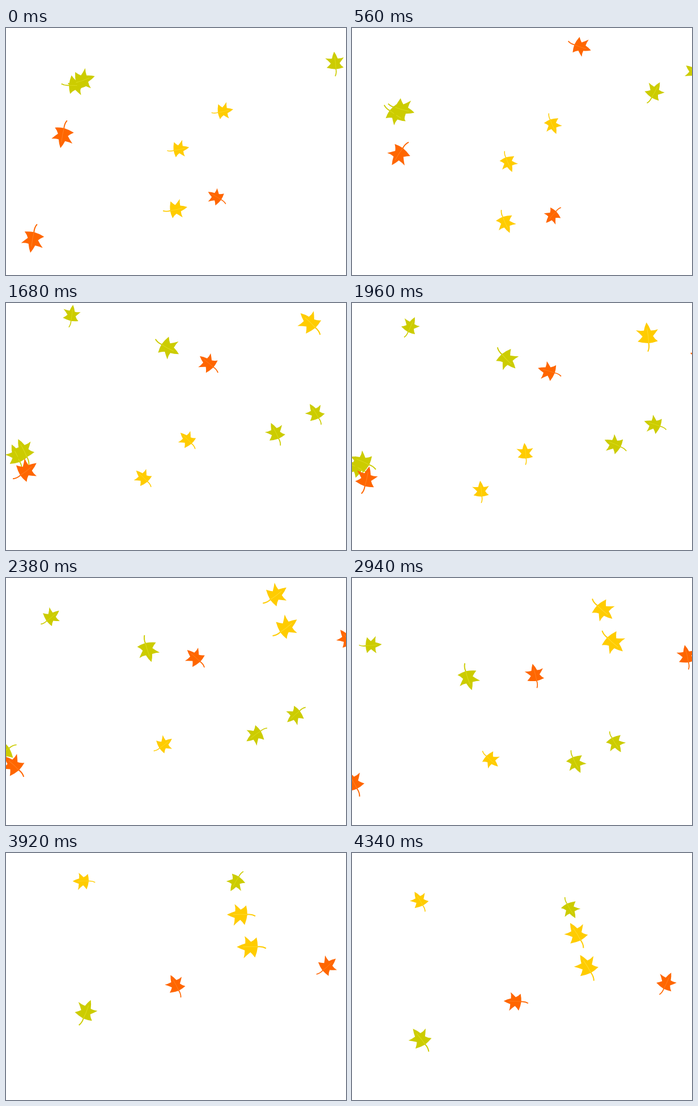
An HTML page with a canvas for the animation above (4.48 s loop, 600 by 436 pixels).

```html
<!DOCTYPE html>
<html lang="en">
<head>
<meta charset="utf-8">
<title>Falling leaves</title>
<style>
  html, body { margin: 0; width: 100%; height: 100%; overflow: hidden; background: #fff; }
  canvas { display: block; }
</style>
</head>
<body>
<canvas id="stage" width="600" height="436"></canvas>
<script>
const STEP = 140, STEPS = 32;
const ctx = document.getElementById('stage').getContext('2d');
const rad = degrees => degrees * Math.PI / 180;

// Uneven breeze: a smooth curve through a few points [step, dx, dy].
function breeze(...points) {
  const end = points.length - 1;
  const slope = (k, axis) => {
    const a = points[Math.max(k - 1, 0)], b = points[Math.min(k + 1, end)];
    return (b[axis] - a[axis]) / (b[0] - a[0]);
  };
  return t => {
    let i = 0;
    while (i < end - 1 && points[i + 1][0] <= t) i++;
    const p = points[i], q = points[i + 1], span = q[0] - p[0];
    const u = (t - p[0]) / span, v = 1 - u;
    return [1, 2].map(axis => v * v * (1 + 2 * u) * p[axis] + u * u * (3 - 2 * u) * q[axis]
      + span * u * v * (v * slope(i, axis) - u * slope(i + 1, axis)));
  };
}

// Turns back fast for 14 steps, then forward slowly for 12.
function swing(t, { peak, top }) {
  const cycle = Math.floor((t - peak) / 26), phase = t - peak - cycle * 26;
  return top - 177 * cycle + (phase < 14 ? -20 * phase : -280 + 8.6 * (phase - 14));
}

const tumble = t => 174 + 19.7 * t;

// Steady fall while tumbling around a point beside the leaf.
function orbit(t) {
  const a = rad(tumble(t) - 58);
  return [-6.4 * t + 9 * Math.cos(a), 8.6 * t + 9 * Math.sin(a)];
}

const green = {
  fill: '#cccc00', vein: '#dddd22', turn: swing,
  drift: breeze([0, 0, 0], [7, -78, 92], [12, -105, 168], [17, -141, 216], [24, -219, 307], [31, -270, 416])
};
const orange = {
  fill: '#ff6600', vein: '#ff8126', turn: swing,
  drift: breeze([0, 0, 0], [7, -32, 59], [12, -64, 106], [17, -87, 140], [24, -106, 195], [31, -134, 262])
};
const yellow = { fill: '#ffcc00', vein: '#ffda33', turn: tumble, drift: orbit };

const leaves = [];
function leaf(kind, size, x, y, peak, top) {
  leaves.push({ kind, size, x, y, peak, top });
}

leaf(green, .92, 124, 101, 4.4, 223);
leaf(green, .95, 136, 92, 5, 210);
leaf(green, .84, 581, 61, 7.7, 156);
leaf(green, .81, 651, 26, 10.3, 98);
leaf(green, .95, 391, -88.5, 19.8, 282);
leaf(green, .78, 221, -147, 22.8, 196);
leaf(green, .8, 655, -317, 25, 366);

leaf(orange, .97, 100, 190, 3.6, 317);
leaf(orange, 1, 47, 374, 0, 286);
leaf(orange, .73, 371, 298, 0, 37);
leaf(orange, .84, 421, 0, 25.4, 120);
leaf(orange, .85, 689, -33, 29.3, 155);

leaf(yellow, .75, 388, 139, 0, 0);
leaf(yellow, .76, 310, 206, 0, 0);
leaf(yellow, .84, 305, 312, 0, 0);
leaf(yellow, 1, 604, -68, 0, 0);
leaf(yellow, .97, 586, -125, 0, 0);
leaf(yellow, .77, 309, -184, 0, 0);

// The leaf points along +x with its stem behind it.
const blade = new Path2D(`M-14 0 Q-14 8 -12 16.5 Q-7 11 -2 9 Q3 14 9 19
  Q7 12 8 6 Q16 4 23 0 Q16 -4 9 -6 Q9 -13 11 -20
  Q5 -14 -1 -9.5 Q-5 -13 -9 -19 Q-13 -9 -14 0Z`);
const stem = new Path2D('M-13 0 Q-22 1 -28.5 -3');
const vein = new Path2D('M-14 0 Q-2 1 12 0');

function drawLeaf(item, t) {
  const { kind, size } = item, [dx, dy] = kind.drift(t);
  const x = item.x + dx, y = item.y + dy;
  // Leaves appear at the top edge; larger ones last a little longer.
  if (y < 3 || y > 275 + 100 * size) return;
  ctx.save();
  ctx.translate(x, y);
  ctx.rotate(rad(kind.turn(t, item) + 174));
  ctx.scale(size, size);
  ctx.fillStyle = ctx.strokeStyle = kind.fill;
  ctx.fill(blade);
  ctx.lineWidth = 2;
  ctx.stroke(stem);
  ctx.strokeStyle = kind.vein;
  ctx.lineWidth = 1;
  ctx.stroke(vein);
  ctx.restore();
}

const start = performance.now();

function draw() {
  const t = Math.floor(Math.max(0, performance.now() - start) / STEP) % STEPS;
  ctx.fillStyle = '#fff';
  ctx.fillRect(0, 0, 600, 436);
  for (const item of leaves) drawLeaf(item, t);
  requestAnimationFrame(draw);
}
draw();
</script>
</body>
</html>
```
